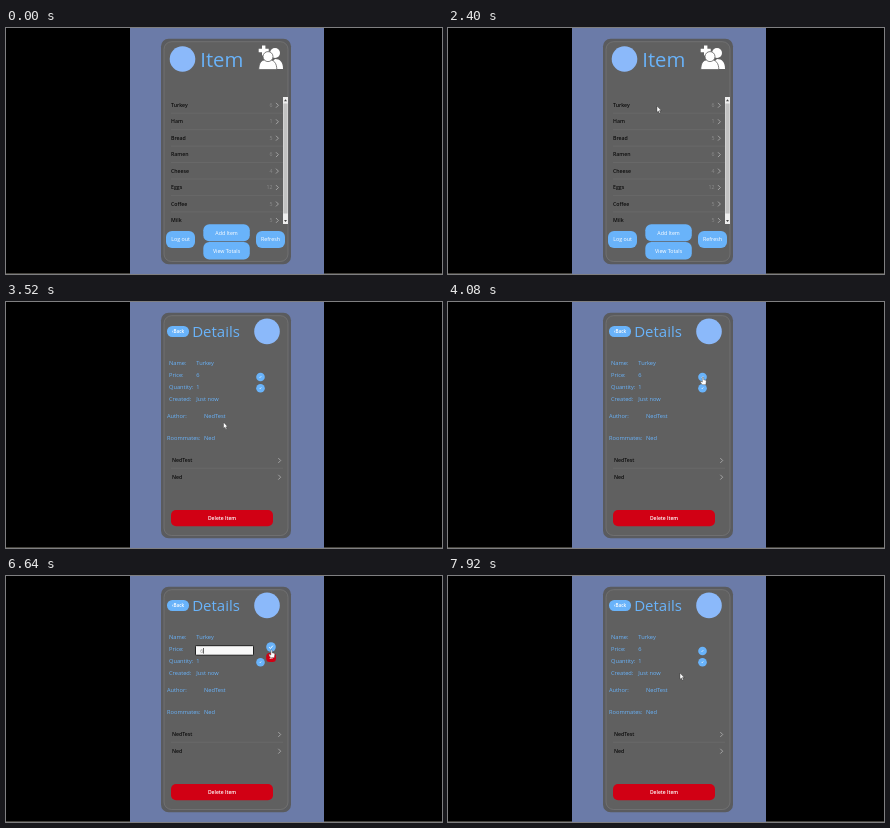
Write an HTML page that moves like this. It is 436 by 246 pixels and loops after 8000 ms.

```html
<!DOCTYPE html>
<html lang="en">
<head>
<meta charset="utf-8">
<title>Shopping list</title>
<style>
  html, body { margin: 0; width: 100%; height: 100%; overflow: hidden; background: #000; }
  svg { display: block; width: 100vw; height: 100vh; }
  text { font-family: "Open Sans", "Noto Sans", sans-serif; font-size: 5.7px; fill: #69b3fa; }
  .title { font-size: 20.3px; }
  .details-title { font-size: 15px; }
  .row { font-size: 5.2px; font-weight: 600; fill: #0c0c0c; }
  .count { font-size: 5.2px; fill: #8c8c8c; text-anchor: end; }
  .button { font-size: 5.3px; fill: #fff; text-anchor: middle; }
  .small { font-size: 4.6px; font-weight: 600; }
  .strong { font-size: 5px; font-weight: 600; }
  .typed { font-size: 5.2px; fill: #888; }
  .placeholder { font-size: 5.2px; fill: #777; }
  .line { fill: none; stroke: #707070; stroke-width: .5; }
  .chevron { fill: none; stroke: #b4b4b4; stroke-width: .8; }
  .glyph { fill: none; stroke: #fff; stroke-width: .9; }
  .blue { fill: #69b3fa; }
  .red { fill: #d10014; }
  .logo { fill: #8bb9fa; }
</style>
</head>
<body>
<svg viewBox="0 0 436 246" preserveAspectRatio="none">
  <rect width="436" height="246"/>
  <rect y="245" width="436" height="1" fill="#45433d"/>
  <rect x="124" width="194" height="246" fill="#6b7ba8"/>
  <rect x="155" y="10.8" width="130" height="225.4" rx="7.5" fill="#5a5b5e"/>
  <rect x="158" y="13.7" width="124" height="219.8" rx="7.5" fill="#606060" stroke="#7c7c7c" stroke-width=".6"/>

  <g id="items">
    <circle class="logo" cx="176.5" cy="31" r="12.8"/>
    <text class="title" x="194.3" y="38.5">Item</text>
    <g fill="#fff">
      <path d="M256 17.5h3.4v3.3h3.3v3.4h-3.3v3.3h-3.4v-3.3h-3.3v-3.4h3.3z"/>
      <circle cx="269" cy="25" r="5"/>
      <path d="M264 41v-5l5-5c5 0 8 3 8 10z"/>
      <g stroke="#606060" stroke-width=".8">
        <path d="M252.8 41.6c0-7 3-9.6 6-9.6h5c4 0 7 3 7 9.6z"/>
        <circle cx="262" cy="28.6" r="5"/>
      </g>
    </g>
    <clipPath id="listArea"><rect x="158" y="68" width="119" height="128"/></clipPath>
    <g id="itemRows" clip-path="url(#listArea)"></g>
    <rect x="277" y="69" width="5" height="127" fill="#eee"/>
    <rect x="277.4" y="75.5" width="4.2" height="110" fill="#c2c2c2"/>
    <path d="M278 73.2l1.5-2 1.5 2zM278 192l1.5 2 1.5-2z" fill="#444"/>
    <g id="itemButtons"></g>
  </g>

  <g id="details">
    <g id="detailButtons"></g>
    <text class="details-title" x="186.2" y="35">Details</text>
    <circle class="logo" cx="261" cy="29.4" r="12.8"/>
    <g id="fields"></g>
    <g id="loaded"></g>
    <g id="roommateRows"></g>
    <circle class="blue" cx="254.5" cy="86.2" r="4.3"/>
    <path class="glyph" d="M253.8 86.9l1.3-1.3"/>
    <g id="pricePencil">
      <circle class="blue" cx="254.5" cy="75" r="4.3"/>
      <path class="glyph" d="M253.8 75.7l1.3-1.3"/>
    </g>
    <g id="editor">
      <rect x="189.5" y="69.7" width="58" height="9.5" rx=".8" fill="#f8f8f8" stroke="#111" stroke-width=".9"/>
      <text id="placeholder" class="placeholder" x="195" y="76.8">Type here</text>
      <g id="typed">
        <text class="typed" x="194.2" y="76.8">6</text>
        <rect x="197.2" y="72" width=".6" height="5.6"/>
      </g>
      <circle class="blue" cx="265" cy="71" r="4.8"/>
      <path class="glyph" d="M263.2 71.2l1.2 1.3 2.4-2.8"/>
      <rect class="red" x="260.2" y="77" width="9.8" height="9" rx="3.5"/>
      <path class="glyph" d="M263.8 80l2.6 3m0-3l-2.6 3"/>
    </g>
  </g>

  <g id="pointer">
    <path id="arrow" d="M0 0v6.2l1.4-1.2 1 2.3 1-.5-1-2.2h1.8z" fill="#fff" stroke="#222" stroke-width=".35"/>
    <path id="hand" d="M-.7 .4q.7-.9 1.4 0v2.4l2 .5q.7.3.6 1.2l-.5 3.2h-3.6l-1.9-2.7q0-.9.8-.7l1.2.8z" fill="#fff" stroke="#222" stroke-width=".35"/>
    <path id="beam" d="M-1.2-2.8h2.4M0-2.8v5.6M-1.2 2.8h2.4" fill="none" stroke="#222" stroke-width=".6"/>
  </g>
</svg>
<script>
const LOOP = 8000, STEP = 80;
const $ = id => document.getElementById(id);
const label = (x, y, text, cls = "") => `<text class="${cls}" x="${x}" y="${y}">${text}</text>`;
const chevron = (x, y) => `<path class="chevron" d="M${x} ${y - 2.4}l2.4 2.4-2.4 2.4"/>`;
const line = y => `<path class="line" d="M165 ${y}H277"/>`;
const button = (x, y, w, h, r, text, color = "blue", cls = "") =>
  `<rect class="${color}" x="${x}" y="${y}" width="${w}" height="${h}" rx="${r}"/>` +
  label(x + w / 2, y + h / 2 + 1.9, text, "button " + cls);

const items = [["Turkey", 6], ["Ham", 1], ["Bread", 5], ["Ramen", 6],
  ["Cheese", 4], ["Eggs", 12], ["Coffee", 5], ["Milk", 5]];
$("itemRows").innerHTML = items.map(([name, count], i) => {
  const y = 77 + i * 16.45;
  return label(165, y + 1.9, name, "row") + label(266.5, y + 1.9, count, "count") +
    chevron(270, y + .3) + line(y + 8.2);
}).join("");

$("itemButtons").innerHTML =
  button(160, 203, 29, 17, 6, "Log out") + button(197.3, 196.2, 46.5, 17, 6, "Add Item") +
  button(197.3, 214, 46.5, 17.5, 6, "View Totals") + button(250, 203, 29, 17, 6, "Refresh");

$("detailButtons").innerHTML =
  button(161, 23.9, 22, 11, 5.2, "‹Back", "blue", "small") +
  button(165, 208, 102, 16.3, 5, "Delete Item", "red", "strong");

$("fields").innerHTML =
  [["Name:", "Turkey"], ["Price:", "6"], ["Quantity:", "1"], ["Created:", ""]].map(([key, value], i) => {
    const y = 63.2 + i * 11.9;
    const text = label(190.3, y, value);
    return label(163, y, key) + (key === "Price:" ? `<g id="price">${text}</g>` : text);
  }).join("") + label(161, 115.8, "Author:") + label(161, 138, "Roommates:");

$("loaded").innerHTML =
  label(190.3, 98.9, "Just now") + label(198, 115.8, "NedTest") + label(198, 138, "Ned");

$("roommateRows").innerHTML = ["NedTest", "Ned"].map((name, i) => {
  const y = 158 + i * 16.7;
  return label(166, y + 1.9, name, "row") + chevron(272.3, y + .5);
}).join("") + line(166.3);

// Pointer path: time, x, y
const path = [
  [480, 126, 96], [800, 126, 96], [880, 129, 96], [1360, 209, 78], [3120, 209, 78],
  [3360, 190, 112], [3440, 200, 130], [3520, 217.5, 120.2], [3760, 243, 92], [4000, 255, 76],
  [4080, 255, 75], [4720, 255, 75], [4960, 246, 80], [5200, 225, 74], [6240, 225, 74],
  [6560, 262, 76], [6640, 265.5, 74], [7200, 265.5, 74], [7600, 224, 104],
  [7840, 224, 104], [7920, 232, 97]
];
function pointerAt(t) {
  const next = path.findIndex(p => p[0] > t);
  if (next < 0) return path[path.length - 1].slice(1);
  const b = path[next], a = path[next - 1] || b;
  const k = a === b ? 0 : (t - a[0]) / (b[0] - a[0]);
  return [a[1] + (b[1] - a[1]) * k, a[2] + (b[2] - a[2]) * k];
}

const show = (id, visible) => { $(id).style.display = visible ? "" : "none"; };

function draw(now) {
  const t = Math.floor((now % LOOP) / STEP) * STEP;
  const within = (from, to) => t >= from && t < to;
  const editing = within(4640, 7280);
  show("items", t < 2480);
  show("details", t >= 2480);
  show("loaded", t >= 2560);
  show("price", !editing);
  show("pricePencil", !editing);
  show("editor", editing);
  show("placeholder", t < 6160);
  show("typed", t >= 6160);

  const hand = within(4080, 4800) || within(6560, 7280);
  const beam = within(5040, 6400);
  show("pointer", t >= 480);
  show("hand", hand);
  show("beam", beam);
  show("arrow", !hand && !beam);
  $("pointer").setAttribute("transform", `translate(${pointerAt(t).join(" ")})`);
}

const start = performance.now();
function tick() {
  draw(performance.now() - start);
  requestAnimationFrame(tick);
}
tick();
</script>
</body>
</html>
```
